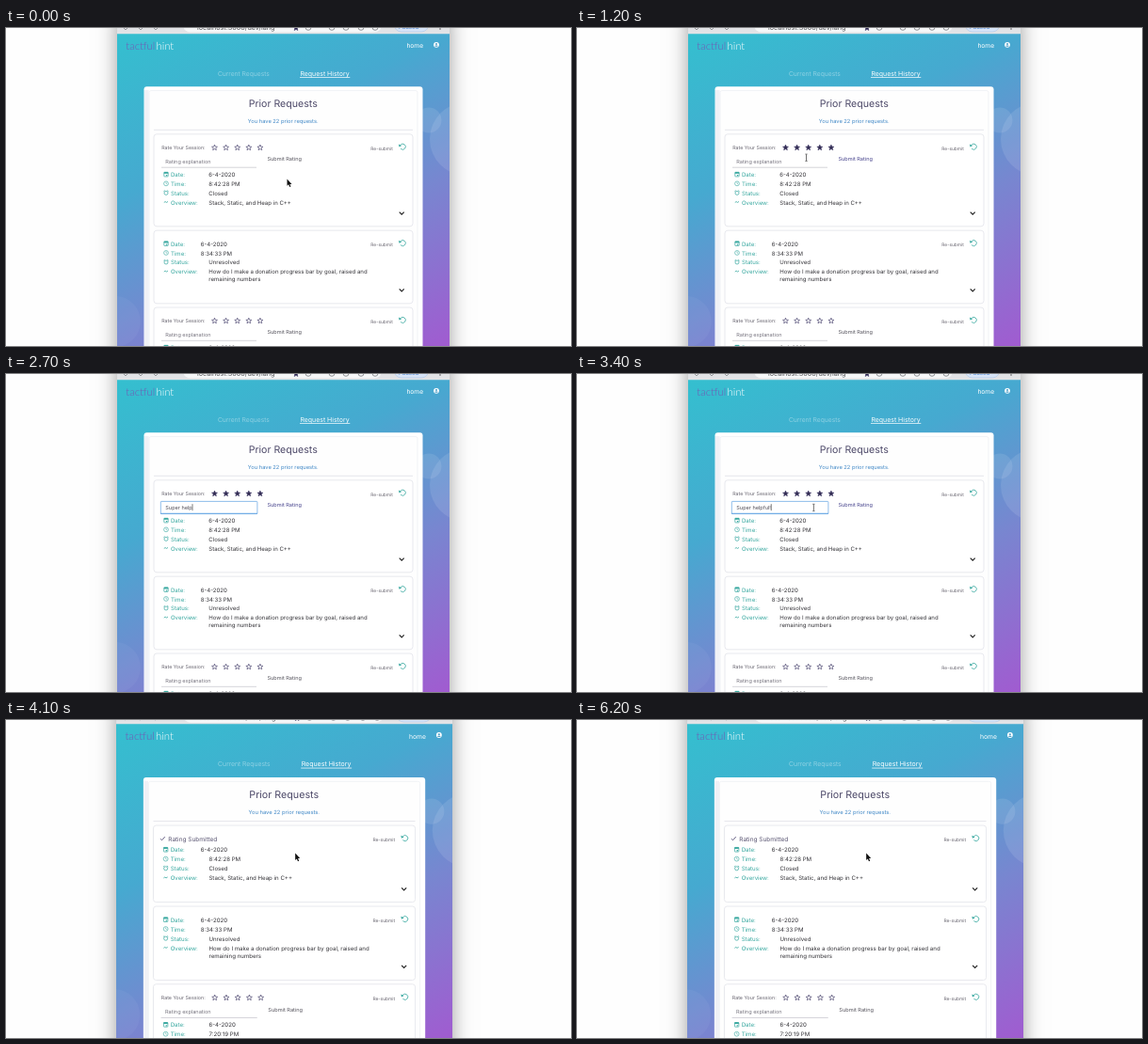
An HTML page with a canvas for the animation above (6.3 s loop, 600 by 338 pixels).

```html
<!DOCTYPE html>
<html lang="en">
<head>
<meta charset="utf-8">
<title>Request history</title>
<style>
html, body { margin: 0; width: 100%; height: 100%; overflow: hidden; background: #fefefe; }
canvas { display: block; width: 600px; height: 338px; }
</style>
</head>
<body>
<canvas id="stage"></canvas>
<script>
const LOOP = 6300, CLICK_STAR = 800, FOCUS = 1400, SUBMIT = 4100;
const MESSAGE = "Super helpful!", TYPE_START = 1570, TYPE_STEP = 110, TYPE_END = 3110;
const SHIFT = -17.4; // how far the list closes up once the rating form is gone
const TEAL = "#36a79f", INK = "#343338", PLUM = "#403a66", GREY = "#66636e";

const canvas = document.getElementById("stage");
const ctx = canvas.getContext("2d");
const dpr = window.devicePixelRatio || 1;
canvas.width = 600 * dpr;
canvas.height = 338 * dpr;

// y is the middle of the capitals
function text(str, x, y, size, color, { align = "left", weight = 400, family = "Inter" } = {}) {
  ctx.font = `${weight} ${size}px ${family}, sans-serif`;
  ctx.textAlign = align;
  ctx.fillStyle = color;
  ctx.fillText(str, x, y + size * 0.35);
}

function box(x, y, w, h, r, fill, stroke, width = 0.7) {
  ctx.beginPath();
  ctx.roundRect(x, y, w, h, r);
  paint(fill, stroke, width);
}

function paint(fill, stroke, width) {
  if (fill) { ctx.fillStyle = fill; ctx.fill(); }
  if (stroke) { ctx.strokeStyle = stroke; ctx.lineWidth = width; ctx.stroke(); }
}

function disc(x, y, r, fill, stroke, width = 0.7) {
  ctx.beginPath();
  ctx.arc(x, y, r, 0, 7);
  paint(fill, stroke, width);
}

function line(points, color, width = 0.7) {
  ctx.beginPath();
  points.forEach(([x, y]) => ctx.lineTo(x, y));
  paint(null, color, width);
}

function path(d, x, y, fill, stroke, width) {
  ctx.save();
  ctx.translate(x, y);
  const shape = new Path2D(d);
  if (stroke) { ctx.strokeStyle = stroke; ctx.lineWidth = width; ctx.stroke(shape); }
  if (fill) { ctx.fillStyle = fill; ctx.fill(shape); }
  ctx.restore();
}

function star(x, y, filled) {
  ctx.beginPath();
  for (let i = 0; i < 10; i++) {
    const r = i % 2 ? 1.35 : 3.1, a = i * Math.PI / 5 - Math.PI / 2;
    ctx.lineTo(x + r * Math.cos(a), y + r * Math.sin(a));
  }
  ctx.closePath();
  paint(filled ? "#302a50" : null, PLUM, 0.65);
}

function rowIcon(kind, x, y) {
  if (kind === 0) {
    box(x - 2.2, y - 2.2, 4.4, 4.6, 0.5, null, TEAL);
    box(x - 2.2, y - 2.4, 4.4, 1.7, 0, TEAL);
    box(x, y + 0.4, 1.3, 1.3, 0, TEAL);
  } else if (kind === 1) {
    disc(x, y, 2.4, null, TEAL, 0.6);
    line([[x, y - 1.5], [x, y], [x + 1.2, y + 0.6]], TEAL, 0.5);
  } else if (kind === 2) {
    disc(x, y + 0.2, 2, null, TEAL);
    line([[x - 2.6, y - 1.5], [x - 1.2, y - 2.6]], TEAL);
    line([[x + 2.6, y - 1.5], [x + 1.2, y - 2.6]], TEAL);
  } else {
    line([[x - 2.2, y + 0.4], [x - 0.8, y - 0.5], [x + 0.4, y + 0.4], [x + 2, y - 0.6]], TEAL, 0.8);
  }
}

function rows(y, values, dateX, timeX) {
  ["Date:", "Time:", "Status:", "Overview:"].forEach((label, i) => {
    const rowY = y + i * 9.85;
    rowIcon(i, 170, rowY - 0.5);
    text(label, 175, rowY, 6.05, TEAL);
    text(values[i], [dateX, timeX, 215.3, 215.3][i], rowY, 6.05, INK);
  });
}

function card(y, h) {
  box(157, y, 275, h, 3, "#fff", "#e3e4ea", 0.8);
  text("Re-submit", 387.3, y + 15.5, 4.85, GREY);
  const cx = 421.3, cy = y + 13.4;
  ctx.beginPath();
  ctx.arc(cx, cy, 3, -2.5, 2.5);
  paint(null, TEAL, 0.8);
  path("M-4.3-2.8L-3.8.2L-1.2-1.2Z", cx, cy, TEAL);
}

function chevron(y) {
  line([[417.7, y - 1.3], [420.2, y + 1.2], [422.7, y - 1.3]], "#222", 1.2);
}

function ratingForm(y, { rated = false, focused = false, typed = "", caret = false } = {}) {
  text("Rate Your Session:", 165.2, y, 5.25, GREY);
  for (let i = 0; i < 5; i++) star(221.5 + i * 12.1, y, rated);
  text("Submit Rating", 277.5, y + 12.2, 5.55, rated ? "#46438c" : "#55535c");
  if (focused) {
    box(164.3, y + 8.2, 102.6, 13.2, 0.6, "#fff", "#8fbdea", 1);
    line([[164, y + 21.2], [267, y + 21.2]], "#74aee6", 1.4);
  } else {
    line([[165, y + 21], [266, y + 21]], "#b8b7c0", 0.6);
  }
  text(typed || "Rating explanation", 169.3, y + 14.4, 5.55, typed ? "#504e58" : "#77747f");
  if (caret) {
    const x = 169.6 + (typed ? ctx.measureText(typed).width : 0);
    line([[x, y + 11], [x, y + 18]], "#222", 0.6);
  }
}

function browserWindow() {
  ctx.save();
  ctx.shadowColor = "rgba(0,0,0,.38)";
  ctx.shadowBlur = 20 * dpr;
  ctx.shadowOffsetY = 4 * dpr;
  box(118, -20, 353, 400, 0, "#8bc");
  ctx.restore();

  const sky = ctx.createLinearGradient(118, 6, 322, 410);
  [[0, "#34bfcf"], [0.35, "#46a9d0"], [0.65, "#7886d0"], [1, "#a05cd0"]]
    .forEach(([at, color]) => sky.addColorStop(at, color));
  box(118, 6, 353, 340, 0, sky);
  ctx.save();
  ctx.beginPath();
  ctx.rect(118, 6, 353, 340);
  ctx.clip();
  disc(489, 118, 39, "rgba(255,255,255,.1)");
  disc(449, 98, 13.5, "rgba(255,255,255,.1)");
  disc(116, 312, 27, "rgba(255,255,255,.04)");
  ctx.restore();

  box(118, -20, 353, 26.3, 0, "#e2e3e6");
  box(188, -14, 211, 18.6, 8, "#f6f7f8");
  box(412, -14, 37, 18, 8, "#d8e5f8", "#b4cbea");
  text("localhost:3000/dev/lang", 203, -0.5, 7.2, "#55565a");
  text("Paused", 417, -1.3, 6, "#4a83d4");
  [127, 143, 159].forEach(x => line([[x - 2, 0], [x, 2], [x + 2, 0]], "#77797d"));
  [321, 346, 361, 377, 392].forEach(x => disc(x, -0.7, 3, null, "#85878c", 0.9));
  star(308, 0, true);
  disc(461, 1, 0.8, "#55565a");
}

function header() {
  text("tactful", 127.3, 18.8, 11.3, "#7457b4", { weight: 300, family: "Lato" });
  text("hint", 159.5, 18.8, 11.3, "#fff", { weight: 300, family: "Lato" });
  text("home", 425.4, 19, 6.7, "#fff");
  disc(457, 17.8, 2.9, "#fff");
  disc(457, 17, 1, "#4b9fc8");
  box(455.4, 18.5, 3.2, 1.2, 0.6, "#4b9fc8");
  text("Current Requests", 252.3, 48.2, 6.8, "rgba(255,255,255,.52)", { align: "center", weight: 300 });
  text("Request History", 338.5, 48.2, 6.95, "#fff", { align: "center" });
  line([[312, 52.5], [365.3, 52.5]], "#fff", 0.7);
}

function page(t) {
  const done = t >= SUBMIT, shift = done ? SHIFT : 0;
  browserWindow();
  header();

  box(146.5, 62.3, 296, 300, 3, "#fff");
  box(147, 66, 4.6, 290, 0, "#f0f1f6");
  box(152, 66.5, 285, 300, 2, "#fefefe", "#eef0f4", 0.8);
  text("Prior Requests", 294.2, 80, 10.6, "#4c4868", { align: "center" });
  text("You have 22 prior requests.", 294.2, 98.6, 5.75, "#3f87c6", { align: "center" });
  line([[157, 108.3], [432, 108.3]], "#e0e1e8", 0.8);

  card(112.8, 98 + shift);
  if (done) {
    line([[164.4, 126.8], [166, 128.3], [169.2, 124.8]], PLUM, 0.8);
    text("Rating Submitted", 172.6, 127.1, 6.4, "#56516f");
  } else {
    const count = Math.max(0, Math.floor((t - TYPE_START) / TYPE_STEP));
    const focused = t >= FOCUS;
    ratingForm(127.2, {
      rated: t >= CLICK_STAR,
      focused,
      typed: MESSAGE.slice(0, count),
      caret: focused && (t < TYPE_END || (t - TYPE_END) % 1000 < 500)
    });
  }

  ctx.save();
  ctx.translate(0, shift);
  rows(156, ["6-4-2020", "8:42:28 PM", "Closed", "Stack, Static, and Heap in C++"], done ? 206.7 : 215.3, 215.3);
  chevron(197);

  card(215.2, 77.6);
  rows(229.6, ["6-4-2020", "8:34:33 PM", "Unresolved",
    "How do I make a donation progress bar by goal, raised and"], 206.7, 206.7);
  text("remaining numbers", 215.3, 267, 6.05, INK);
  chevron(278.7);

  card(297, 98);
  ratingForm(311.3);
  rows(340, ["6-4-2020", "7:20:19 PM", "Closed", "Sorting a list"], 215.3, 215.3);
  ctx.restore();
}

// time, x, y
const TRACK = [
  [0, 298.5, 160.5], [100, 298.5, 160.5], [550, 268.8, 128.5], [950, 268.8, 128.5],
  [1350, 232, 142], [3200, 232, 142], [3800, 306, 142]
];

function pointerAt(t) {
  const next = TRACK.findIndex(key => key[0] > t);
  if (next < 0) return TRACK.at(-1).slice(1);
  const [t0, x0, y0] = TRACK[next - 1], [t1, x1, y1] = TRACK[next];
  const p = (t - t0) / (t1 - t0), e = p * p * (3 - 2 * p);
  return [x0 + (x1 - x0) * e, y0 + (y1 - y0) * e];
}

function pointer(t) {
  if (t >= TYPE_START && t < 3200) return;
  const [x, y] = pointerAt(t);
  const overStars = x > 218 && x < 273 && y < 131;
  const overSubmit = t < SUBMIT && x > 277 && x < 315 && y > 136 && y < 144;
  const overInput = x > 164 && x < 267 && y > 135 && y < 149;
  if (overStars || overSubmit) {
    path("M-.8.8Q0-.4.8.8V3.3L3.3 4Q4.4 4.3 4.2 5.6L3.3 8.6H-.8L-3.2 5.4Q-3.2 4.3-2 4.7L-.8 5.7Z",
      x, y, "#fff", "#222", 1.4);
  } else if (overInput) {
    line([[x, y - 3.5], [x, y + 3.5]], "#333", 0.7);
    line([[x - 1.2, y - 3.7], [x + 1.2, y - 3.7]], "#333", 0.6);
    line([[x - 1.2, y + 3.7], [x + 1.2, y + 3.7]], "#333", 0.6);
  } else {
    path("M0 0V7.2L1.6 5.8L2.8 8.5L4 8L2.9 5.4H5Z", x, y, "#111", "#fff", 1.1);
  }
}

function frame() {
  const t = performance.now() % LOOP;
  ctx.setTransform(dpr, 0, 0, dpr, 0, 0);
  ctx.textRendering = "geometricPrecision";
  ctx.fillStyle = "#fefefe";
  ctx.fillRect(0, 0, 600, 338);
  if (t >= SUBMIT) ctx.transform(1.0113, 0, 0, 1.0113, -2.3, -2);
  page(t);
  pointer(t);
  requestAnimationFrame(frame);
}
frame();
</script>
</body>
</html>
```
